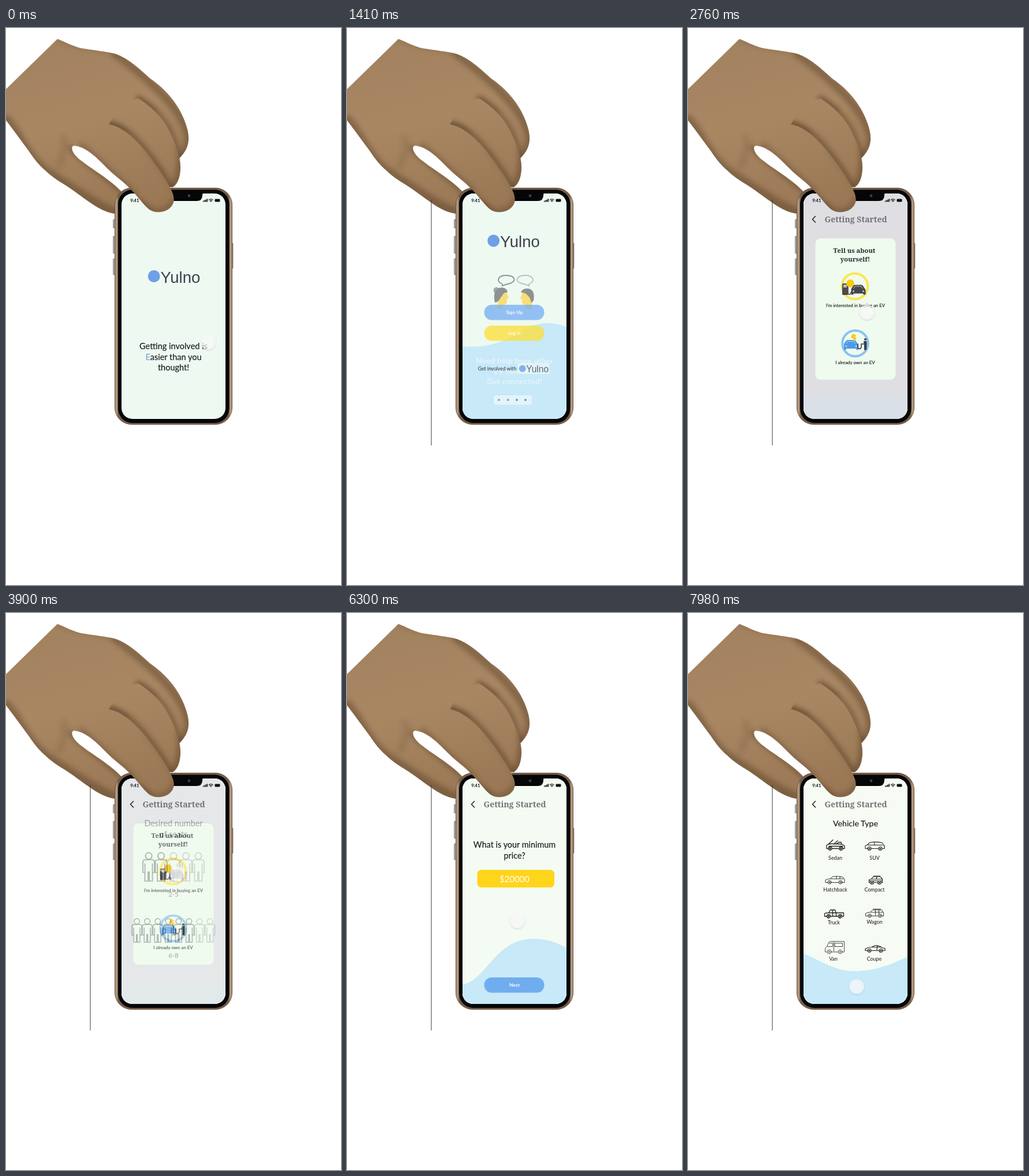
An HTML page that plays this animation: 580x966 px, repeating every 8000 ms.

```html
<!DOCTYPE html>
<html lang="en">
<head>
<meta charset="utf-8">
<title>Phone walkthrough</title>
<style>
  html, body { margin: 0; width: 100%; height: 100%; overflow: hidden; background: #fff; }
  svg { display: block; width: 100%; height: 100%; }
  text { font-family: Lato, "Open Sans", sans-serif; text-anchor: middle; fill: #15171a; }
  .med { stroke: #15171a; stroke-width: .12; }
  .bold { font-weight: 700; }
  .white { fill: #fff; }
  .serif { font-family: "Noto Serif", serif; font-weight: 700; }
  .mark { font-family: "Liberation Sans", Arial, sans-serif; fill: #3d404c; text-anchor: start; }
  .line { fill: none; stroke: #222; stroke-linejoin: round; stroke-linecap: round; }
</style>
</head>
<body>
<svg id="stage" viewBox="0 0 580 966" preserveAspectRatio="none"></svg>
<script>
const LOOP = 8000;
const PALE = '#eef9f1', IVORY = '#f4fbf2', WATER = '#c7e9f8';
const BLUE = '#70adee', YELLOW = '#ffd51c', MARK = '#6f9fe6';

// ---- drawing helpers ----
const text = (x, y, size, str, cls = '', extra = '') =>
  `<text x="${x}" y="${y}" font-size="${size}" class="${cls}" ${extra}>${str}</text>`;
const rect = (x, y, w, h, r, fill, extra = '') =>
  `<rect x="${x}" y="${y}" width="${w}" height="${h}" rx="${r}" fill="${fill}" ${extra}/>`;
const circle = (x, y, r, fill, extra = '') =>
  `<circle cx="${x}" cy="${y}" r="${r}" fill="${fill}" ${extra}/>`;
const path = (d, fill, extra = '') => `<path d="${d}" fill="${fill}" ${extra}/>`;
const stroke = (d, color, width, extra = '') =>
  path(d, 'none', `stroke="${color}" stroke-width="${width}" stroke-linecap="round" ${extra}`);
const layer = (id, body) => `<g id="${id}">${body}</g>`;
const page = fill => rect(196, 282, 188, 402, 0, fill);
const wave = d => path(d + 'V690H196V552Z', WATER);
const button = (y, label, fill) =>
  rect(237.5, y, 104, 26.5, 13.2, fill) + text(290, y + 16.3, 8.4, label, 'bold white');
const header = () =>
  stroke('M220.5 326.5L215.5 331.8L220.5 337', '#222', 1.5) +
  text(290.5, 337, 14, 'Getting Started', 'serif', 'style="fill:#747579"');
const wordmark = (x, y, size) =>
  circle(x + size * .37, y - size * .4, size * .38, MARK) +
  text(x + size * .78, y, size, 'Yulno', 'mark');

// ---- hand ----
const PALM = 'M89 19C104 25 117 32 130 35C152 39 172 40 190 45C213 53 231 71 250 88C277 106 300 134 310 163' +
  'C319 187 320 207 300 226L250 230L180 170L150 209L118 204C110 205 115 219 130 230C150 246 180 262 202 286' +
  'L200 310L188 322C165 318 150 306 125 288C105 272 85 264 68 247C56 237 48 226 40 214L12 176L0 160V106Z';
const MIDDLE = 'M229 122C250 135 272 155 284 182C295 205 303 225 302 245C301 262 296 271 289 276L255 276L178 167L200 130Z';
const INDEX = 'M118 204C140 206 160 228 175 243C190 258 204 267 213 277C225 288 235 303 246 313C256 322 274 321 284 312' +
  'C291 305 292 298 289 288C284 273 265 245 244 217C226 195 205 172 178 167L130 170Z';

function part(id, d, shades) {
  const lines = shades.map(([s, w, o]) => stroke(s, '#4f3722', w, `opacity="${o}" filter="url(#soft)"`)).join('');
  return `<clipPath id="${id}">${path(d, '#000')}</clipPath>` +
    path(d, 'url(#skin)') + `<g clip-path="url(#${id})">${lines}</g>`;
}

const handBack =
  part('palm', PALM, [
    ['M0 161L12 177C25 196 40 228 65 248C105 274 150 306 188 322', 20, .4],
    ['M190 45C230 75 297 130 312 175C320 195 316 212 300 226', 14, .4],
    ['M89 19C120 35 165 36 190 45', 6, .2],
    ['M112 207C120 224 180 262 202 286', 8, .45],
    ['M229 122C250 134 274 155 286 182C296 205 302 222 303 235', 9, .45],
    ['M230 124C240 130 250 137 258 144', 6, .45],
    ['M100 190C104 205 100 222 92 238', 10, .14]
  ]) +
  part('middle', MIDDLE, [
    ['M302 205C305 245 298 268 289 276', 14, .4],
    ['M178 165C208 172 228 195 246 217C268 246 284 268 290 288', 10, .5],
    ['M179 167C190 169 200 175 208 181', 6, .5]
  ]);
const handFront = part('index', INDEX, [
  ['M130 204C150 218 190 258 213 277C225 292 235 307 246 315', 9, .36],
  ['M236 306C250 324 280 322 290 300', 10, .36],
  ['M240 212C266 245 284 272 290 290', 4, .2]
]);

// ---- phone ----
const phoneBack =
  [[332, 15], [361, 30], [400, 28]].map(([y, h]) => rect(185.5, y, 4, h, 1, '#a9a7a8', 'stroke="#6b6768" stroke-width=".6"')).join('') +
  rect(389.5, 373, 3.5, 44, 1, '#a58a70', 'stroke="#6d5a4b" stroke-width=".6"') +
  rect(188.5, 277.5, 203, 410, 29, 'url(#metal)', 'stroke="#6b5644" stroke-width="1"') +
  rect(194, 280.5, 192.5, 404.5, 25, '#060608');
const phoneTop =
  path('M234 282H346Q340 284 340 290Q340 300 330 300H250Q240 300 240 290Q240 284 234 282Z', '#060608') +
  circle(317, 291, 2.4, '#3b3d52') +
  text(222.8, 301.6, 7.6, '9:41', 'bold') +
  [0, 1, 2, 3].map(i => rect(341 + i * 2.2, 299.6 - i * 1.1, 1.6, 2 + i * 1.1, .3, '#111')).join('') +
  stroke('M351.5 298Q354.7 295.2 358 298M353.2 299.8Q354.7 298.6 356.3 299.8', '#111', 1.3) +
  circle(354.8, 301, .8, '#111') +
  rect(361.5, 296.6, 9, 4.8, 1.3, '#111');

// ---- screens ----
const splash = page(PALE) +
  text(290, 557, 14.5, 'Getting involved is', 'med') +
  text(290, 575.5, 14.5, `<tspan style="fill:${MARK};stroke:none">E</tspan>asier than you`, 'med') +
  text(290, 594, 14.5, 'thought!', 'med');

const bubble = (x, color, flip) => stroke(
  'M-9 6C-18 2 -15 -8 0 -8S19 3 4 6.5Q-1 7.5 -8 10.5Q-5 7.5 -9 6Z', color, 1.8,
  `transform="translate(${x} 437) scale(${flip} 1)"`);
const heads =
  bubble(276, '#2f2f35', 1) + bubble(308, '#8b8b90', -1) +
  path('M262 458Q273 453 277 460L280 468L277 470Q278 480 270 480V487H258Q264 476 262 458Z', '#ffc400') +
  circle(259, 455, 5.5, '#4d5f64') +
  path('M256 476Q251 452 268 450Q278 451 278 459Q271 458 269 464Q266 467 264 471Q261 476 256 476Z', '#2f3036') +
  path('M304 458Q314 454 320 461L321 487H309V480Q302 480 303 471L300 469Z', '#ffc400') +
  path('M301 459Q304 450 315 452Q326 455 323 473L319 477Q318 468 312 463Q306 458 301 459Z', '#2f3036');

const intro = page(PALE) + wave('M196 552C240 556 272 545 300 527S355 507 384 520');
const details = heads +
  text(290, 582, 14, 'Need help from other', 'bold white') +
  text(290, 600, 14, 'EV owners?', 'bold white') +
  text(290, 618, 14, 'Get connected!', 'bold white') +
  rect(254, 637, 66, 16.5, 4, '#fff') +
  [263, 278.5, 294, 309].map((x, i) => circle(x, 645, 2, i < 2 ? '#666a75' : '#1d4f9f')).join('');

const login = button(480, 'Sign Up', '#74adf4') + button(516, 'Log in', '#ffdf35') +
  text(260, 594, 8.6, 'Get involved with', 'med') +
  rect(296, 581, 55, 19, 0, '#f4f9fa', 'opacity=".75"') + wordmark(298, 597, 15.6);

const sideCar = (x, y, color) => `<g transform="translate(${x} ${y})">` +
  path('M0 -11L4 -17Q5 -18 7 -18H17Q19 -18 20 -17L24 -11Q25 -10 25 -8V-1H21V-3H4V-1H0Z', color) +
  stroke('M4.5 -12L6.5 -15.5H17.5L19.5 -12', '#d9dde2', .8) +
  circle(4, -7, 1.2, '#eee') + circle(21, -7, 1.2, '#eee') + '</g>';

const modal = page('#dfdee3') +
  rect(196, 640, 188, 50, 0, '#d6e3ec', 'opacity=".6"') + header() +
  rect(220.5, 365, 139, 245, 9, '#eefbee') +
  text(288, 390, 11.2, 'Tell us about', 'serif', 'style="fill:#26282e"') +
  text(289.5, 404.5, 11.2, 'yourself!', 'serif', 'style="fill:#26282e"') +
  circle(289, 448, 22.3, 'none', 'stroke="#ffe450" stroke-width="4"') +
  rect(267, 443, 10, 20, 1.5, '#4a4a50') + rect(269, 445, 6, 5, .5, '#b9bcc0') +
  stroke('M277 447V460Q280 465 282 459L284 455', '#4a4a50', 1.6) +
  circle(281, 443, 6.8, '#ffc905') + sideCar(282.5, 463.5, '#45464c') +
  text(290, 484, 7.8, "I'm interested in buying an EV", 'med') +
  circle(289.5, 547, 22.3, 'none', 'stroke="#8cc1f3" stroke-width="4"') +
  sideCar(270, 559, '#4c9be8') +
  path('M285 530L291 533L289 536L292 538L286 544L287 539L282 537Z', '#ffc905') +
  stroke('M294 548V554Q297 559 300 554V548H305', '#3d3e44', 1.6) +
  circle(307, 540, 2, '#3d3e44') + path('M304 543H309.5V551L309 558.5H305V551Z', '#3d3e44') +
  text(289.5, 583, 7.9, 'I already own an EV', 'med');

const person = (x, y, scale, color) =>
  `<g transform="translate(${x} ${y}) scale(${scale})" class="line" style="stroke:${color};stroke-width:1.7">` +
  '<circle cy="6.3" r="5.7"/><path d="M-6 13H6Q10 13 10 17V35H6.5V20M6.5 34V50H1V34H-1V50H-6.5V20M-6.5 35H-10V17Q-10 13 -6 13"/></g>';
const crowd = (n, dark, x, pitch, y, scale) =>
  Array.from({ length: n }, (_, i) => person(x + i * pitch, y, scale, i < dark ? '#16181c' : '#85858b')).join('');

const seats = page(IVORY) + header() +
  text(290, 370, 14.4, 'Desired number', 'med') + text(290, 388.5, 14.4, 'of seats', 'med') +
  crowd(5, 2, 247, 21.5, 415, 1) + text(290, 491.5, 11.4, '2-5', 'med') +
  crowd(8, 6, 226.5, 18.1, 529.5, .83) + text(290, 598, 11.4, '6-8', 'med');
const picked = wave('M196 584C225 593 262 627 305 627S355 618 384 608') +
  rect(261, 478.5, 58, 18, 9, YELLOW) + text(290, 491.5, 11.4, '2-5', 'white') +
  button(632, 'Next', '#66a9ee');

const price = page(IVORY) + wave('M196 645C240 642 255 565 322 565C350 565 370 574 384 584') + header() +
  text(290, 407, 14.4, 'What is your minimum', 'med') + text(290, 425.5, 14.4, 'price?', 'med');
const amount = rect(225.5, 445.5, 133.5, 30.5, 7, YELLOW) +
  text(290, 467, 14.8, '$20000', 'white') + button(632, 'Next', BLUE);

const vehicle = (x, y, d, a, b, label, lx, ly, width = 1.1, r = 3) =>
  `<g transform="translate(${x} ${y})" class="line" style="stroke-width:${width}">` +
  `<path d="${d}"/>${circle(a, -3, r, IVORY)}${circle(b, -3, r, IVORY)}${circle(a, -3, 1, 'none')}${circle(b, -3, 1, 'none')}</g>` +
  text(lx, ly, 8.9, label);

const cars = page('#f6fcf3') + wave('M196 589C228 601 252 621 288 621S352 610 384 594') + header() +
  text(290, 370, 14.2, 'Vehicle Type', 'med') +
  vehicle(239, 411.5, 'M1 -3V-9Q6 -12 13 -11H23Q31 -10 32 -7V-3ZM4 -10.5L12 -18M14 -11L20 -16.5M18 -11L22 -14H26L27 -11M5 -7H29', 7, 26, 'Sedan', 255, 427.5, 1.3) +
  vehicle(306, 411.5, 'M1 -3V-8L4 -9L9 -13.5Q20 -15.5 30 -13L33 -9Q35 -7 34 -3ZM6 -9H31M17 -14V-9', 8, 27, 'SUV', 323, 427.5) +
  vehicle(237, 470, 'M1 -3V-7Q4 -9 9 -9L14 -13Q24 -14 31 -12L34 -8V-3ZM10 -9H32M20 -13V-9M26 -13V-9', 8, 27, 'Hatchback', 255, 482.5, .9) +
  vehicle(312.5, 470.5, 'M1 -3V-8L5 -9L8 -13H21L24 -9V-3ZM6 -9H23M14 -13V-9M9 -14.5H20M2 -6H23', 6, 19, 'Compact', 323, 482.5, 1.2) +
  vehicle(235.5, 529, 'M1 -3V-8Q4 -9 8 -9L11 -14H19L21 -9H34V-3ZM9 -9H20M15 -14V-4M21 -9V-4', 8, 28, 'Truck', 252.5, 539.5, 1.3) +
  vehicle(306.5, 528, 'M1 -3V-7Q4 -9 9 -9L13 -13H29L32 -8V-3ZM10 -9H31M18 -13V-4M24 -13V-4M14 -14.5H27', 8, 26, 'Wagon', 323, 538.5, .9) +
  vehicle(236.5, 590.5, 'M1 -3V-9L4 -12L7 -19Q8 -21 11 -21H34V-3ZM5 -12H14V-18H8M18 -18H31V-12H18ZM16 -20V-4', 8, 27, 'Van', 251.5, 602.5, .8, 3.4) +
  vehicle(306, 588.5, 'M1 -3V-6Q6 -9 12 -9L18 -12Q25 -12 30 -8L35 -7V-3ZM13 -9H29M22 -12L21 -4', 8, 28, 'Coupe', 322.5, 602.5, 1.2);

const stage = document.getElementById('stage');
stage.innerHTML = `<defs>
  <linearGradient id="skin" gradientUnits="userSpaceOnUse" x1="110" y1="20" x2="190" y2="320">
    <stop offset="0" stop-color="#a38260"/><stop offset=".45" stop-color="#a98763"/><stop offset="1" stop-color="#9a7855"/>
  </linearGradient>
  <linearGradient id="metal">
    <stop offset="0" stop-color="#8c7562"/><stop offset=".012" stop-color="#c0a78a"/><stop offset=".03" stop-color="#755d47"/>
    <stop offset=".97" stop-color="#755d47"/><stop offset=".988" stop-color="#c0a78a"/><stop offset="1" stop-color="#8c7562"/>
  </linearGradient>
  <filter id="soft" filterUnits="userSpaceOnUse" x="-20" y="0" width="380" height="360"><feGaussianBlur stdDeviation="4"/></filter>
  <filter id="lift" x="-50%" y="-50%" width="200%" height="200%"><feDropShadow dx="0" dy="1" stdDeviation="1.2" flood-color="#56607a" flood-opacity=".4"/></filter>
  <clipPath id="glass"><rect x="200" y="287" width="180" height="391" rx="19"/></clipPath>
</defs>
<rect width="580" height="966" fill="#fff"/>
${handBack}
<rect id="rule" x="145.5" y="298" width="1" height="426" fill="#3a3a3a"/>
${phoneBack}
<g clip-path="url(#glass)">
  ${layer('splash', splash)}${layer('intro', intro + layer('details', details))}${layer('login', login)}
  ${layer('logo', wordmark(246, 441.5, 27.5))}
  ${layer('start', page(PALE) + header())}${layer('modal', modal)}
  ${layer('seats', seats)}${layer('picked', picked)}
  ${layer('price', price)}${layer('amount', amount)}${layer('cars', cars)}
  <g id="cursor" filter="url(#lift)">${circle(0, 0, 13, '#fff', 'fill-opacity=".72"')}${circle(0, 0, 10, '#fff', 'fill-opacity=".3"')}</g>
</g>
${phoneTop}
${handFront}`;

// ---- motion ----
// layer: start, end, opacity before, opacity at start, opacity at end
const FADES = {
  intro: [30, 780, 0, 0, 1], details: [1150, 1680, 1, 1, 0], login: [930, 1570, 0, 0, 1],
  start: [1740, 2280, 0, 0, 1], modal: [2490, 2590, 0, .25, 1],
  seats: [3900, 4250, 0, .32, 1], picked: [4500, 4680, 0, 0, 1], price: [5220, 5490, 0, 0, 1],
  amount: [5900, 6100, 0, 0, 1], cars: [7200, 7700, 0, 0, 1]
};
// time, x, y, opacity
const TRAIL = [
  [0, 350, 545, .8], [30, 350, 545, .7], [300, 350, 545, 0], [1500, 310, 493, 0], [1740, 310, 493, .9],
  [2760, 310, 493, .9], [3480, 297, 453, .9], [4050, 297, 453, .9], [4450, 290, 488, .9], [4700, 290, 488, .9],
  [5090, 285, 648, .9], [5420, 285, 648, .9], [5850, 292, 461, .9], [6060, 292, 461, .9],
  [6300, 295, 534, .9], [6680, 292, 648, .9], [LOOP, 292, 648, .9]
];
const TAPS = [1850, 3645, 4560, 5175, 5950, 6950];

const part01 = (t, a, b) => Math.min(1, Math.max(0, (t - a) / (b - a)));
const ease = u => u * u * (3 - 2 * u);
const node = Object.fromEntries(
  [...Object.keys(FADES), 'rule', 'logo', 'cursor'].map(id => [id, document.getElementById(id)]));

function cursorAt(t) {
  const i = Math.max(1, TRAIL.findIndex(k => k[0] >= t));
  const a = TRAIL[i - 1], b = TRAIL[i];
  const u = ease(part01(t, a[0], b[0]));
  return [1, 2, 3].map(n => a[n] + (b[n] - a[n]) * u);
}

function draw(t) {
  for (const [id, [a, b, before, from, to]] of Object.entries(FADES)) {
    const shown = t < a ? before : from + (to - from) * part01(t, a, b);
    node[id].setAttribute('opacity', shown);
  }
  node.rule.setAttribute('opacity', t < 30 ? 0 : 1);
  const rise = ease(part01(t, 30, 780));
  node.logo.setAttribute('transform', `translate(${-2.5 * rise} ${-61.5 * rise})`);

  const [x, y, shown] = cursorAt(t);
  const press = Math.max(...TAPS.map(tap => 1 - Math.min(1, Math.abs(t - tap) / 90)));
  node.cursor.setAttribute('transform', `translate(${x} ${y}) scale(${1 - .14 * press})`);
  node.cursor.setAttribute('opacity', shown);
}

const begin = performance.now();
function tick() {
  draw((performance.now() - begin) % LOOP);
  requestAnimationFrame(tick);
}
draw(0);
requestAnimationFrame(tick);
</script>
</body>
</html>
```
